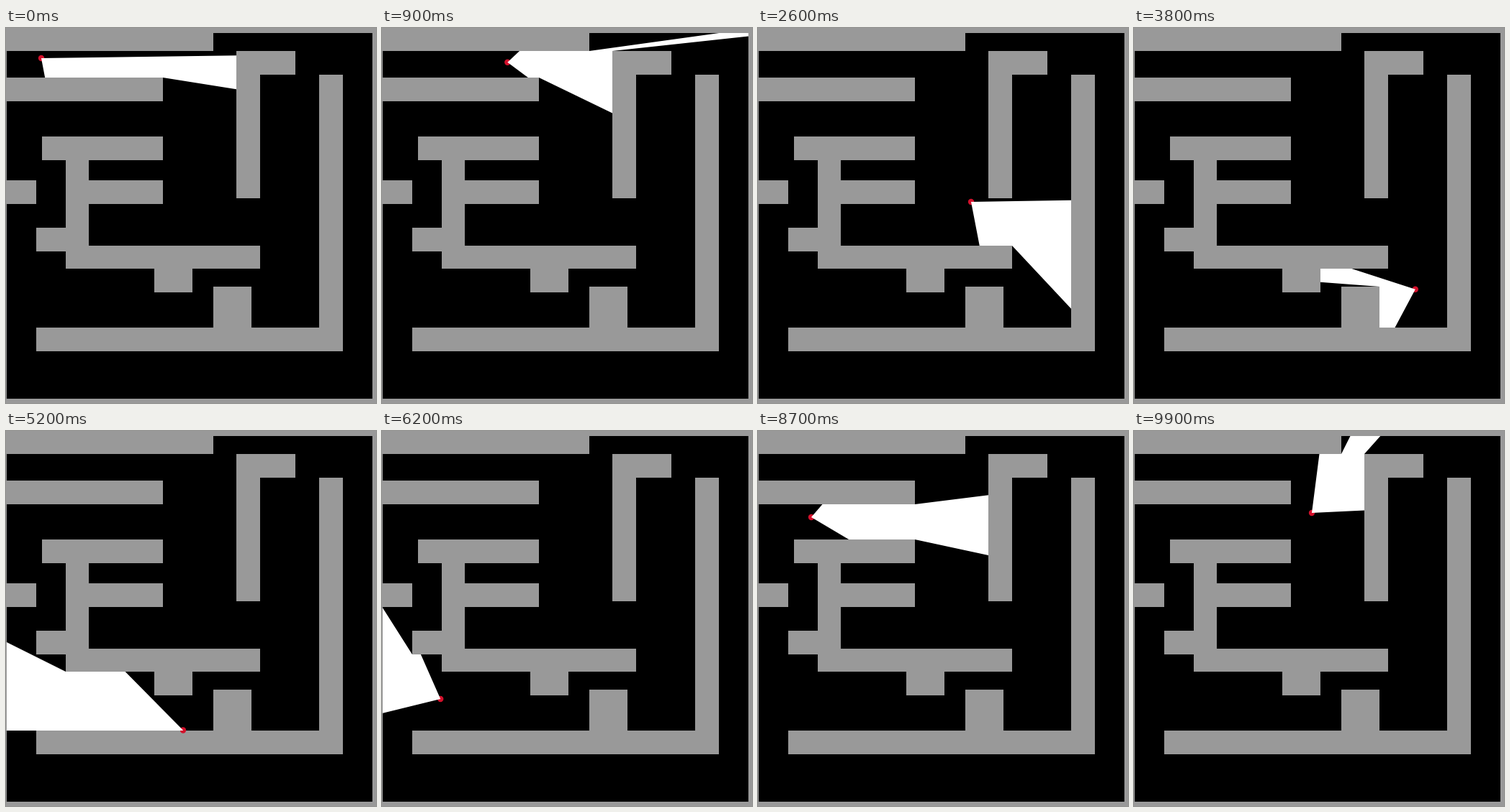
These frames come from a looping animation (514x522 px, 10 s). An HTML page with a canvas:

```html
<!DOCTYPE html>
<html lang="en">
<head>
<meta charset="utf-8">
<title>Line of sight in a maze</title>
<style>
  html, body { margin: 0; width: 100%; height: 100%; overflow: hidden; background: #999; }
  canvas { display: block; }
</style>
</head>
<body>
<canvas id="stage" width="514" height="522"></canvas>
<script>
const ctx = document.getElementById('stage').getContext('2d');
const LOOP = 10000, STEP = 100, SPEED = 0.14;
const RAD = Math.PI / 180, HALF_VIEW = 40 * RAD;

// The maze lies on a square grid; every bar is THICK cells wide
const CELL = 8.2, THICK = 4;
const box = (x, y, w, h) => ({
  left: Math.round(0.6 + x * CELL), right: Math.round(0.6 + (x + w) * CELL),
  top: Math.round(7.4 + y * CELL), bottom: Math.round(7.4 + (y + h) * CELL)
});
const across = (x, y, length) => box(x, y, length, THICK);
const down = (x, y, length) => box(x, y, THICK, length);

const room = box(0, 0, 62, 62);
const walls = [
  across(0, -1, 35), across(0, 7.5, 26.5),
  across(39, 3, 10), down(39, 3, 25),
  across(6, 17.5, 20.5), down(10, 21.5, 18.5), across(14, 25, 12.5),
  across(0, 25, 5), across(5, 33, 5),
  across(10, 36, 33), across(25, 40, 6.5),
  down(35, 43, 7), down(37.5, 43, 7),
  across(5, 50, 52), down(53, 7, 47)
];

// The walker always faces along its path
const pose = (time, x, y, degrees) => ({
  time, x, y,
  vx: SPEED * Math.cos(degrees * RAD),
  vy: SPEED * Math.sin(degrees * RAD)
});
const poses = [
  pose(0, 49, 42, 39.2),
  pose(1100, 203, 49, 10),
  pose(1600, 251.5, 103, 85.2),
  pose(2600, 296, 242, 39.1),
  pose(3300, 374, 311, 60),
  pose(3850, 385, 365, 175),
  pose(4400, 333, 348, 190),
  pose(4800, 278, 350, 150),
  pose(5200, 246, 416.5, 185.4),
  pose(7100, 12, 278, -78),
  pose(7500, 57, 240, -60),
  pose(8000, 44, 176, -110),
  pose(8700, 74, 120, -9.3),
  pose(9900, 247, 114, -42.7)
];

const corners = ({ left, top, right, bottom }) =>
  [[left, top], [right, top], [right, bottom], [left, bottom]];
const outlines = [room, ...walls].map(corners);
const points = outlines.flat();
const edges = outlines.flatMap(c => c.map((p, i) => [p, c[(i + 1) % 4]]));

// Cubic Hermite position and slope
function curve(p, q, vp, vq, u) {
  const v = 1 - u;
  return {
    at: v * v * (1 + 2 * u) * p + u * u * (3 - 2 * u) * q + u * v * (v * vp - u * vq),
    slope: 6 * u * v * (q - p) + v * (1 - 3 * u) * vp + u * (3 * u - 2) * vq
  };
}

function walker(time) {
  const next = Math.max(1, poses.findIndex(p => p.time >= time));
  const a = poses[next - 1], b = poses[next], span = b.time - a.time;
  const u = (time - a.time) / span;
  const x = curve(a.x, b.x, a.vx * span, b.vx * span, u);
  const y = curve(a.y, b.y, a.vy * span, b.vy * span, u);
  return { x: x.at, y: y.at, heading: Math.atan2(y.slope, x.slope) };
}

function castRay(x, y, angle) {
  const dx = Math.cos(angle), dy = Math.sin(angle);
  let near = 1000;
  for (const [[ax, ay], [bx, by]] of edges) {
    const ex = bx - ax, ey = by - ay, det = dx * ey - dy * ex;
    if (Math.abs(det) < 1e-9) continue;
    const px = ax - x, py = ay - y;
    const dist = (px * ey - py * ex) / det;
    const along = (px * dy - py * dx) / det;
    if (dist > 1e-6 && dist < near && along >= 0 && along <= 1) near = dist;
  }
  return [x + dx * near, y + dy * near];
}

// Rays to both view limits and just past each corner between them
function viewShape({ x, y, heading }) {
  const offsets = [-HALF_VIEW, HALF_VIEW];
  for (const [px, py] of points) {
    const turn = Math.atan2(py - y, px - x) - heading;
    const off = Math.atan2(Math.sin(turn), Math.cos(turn));
    for (const o of [off - 1e-5, off, off + 1e-5])
      if (Math.abs(o) < HALF_VIEW) offsets.push(o);
  }
  return offsets.sort((a, b) => a - b).map(o => castRay(x, y, heading + o));
}

function fillBox({ left, top, right, bottom }, color) {
  ctx.fillStyle = color;
  ctx.fillRect(left, top, right - left, bottom - top);
}

function draw(time) {
  const eye = walker(time);
  ctx.fillStyle = '#999';
  ctx.fillRect(0, 0, 514, 522);
  fillBox(room, '#000');
  walls.forEach(w => fillBox(w, '#999'));

  ctx.fillStyle = '#d3102b';
  ctx.beginPath();
  ctx.arc(eye.x, eye.y, 4.2, 0, 2 * Math.PI);
  ctx.fill();

  ctx.fillStyle = '#fff';
  ctx.beginPath();
  ctx.moveTo(eye.x, eye.y);
  viewShape(eye).forEach(p => ctx.lineTo(...p));
  ctx.fill();
}

const start = performance.now();
function tick() {
  const time = (performance.now() - start) % LOOP;
  draw(Math.floor(time / STEP) * STEP);
  requestAnimationFrame(tick);
}
tick();
</script>
</body>
</html>
```
